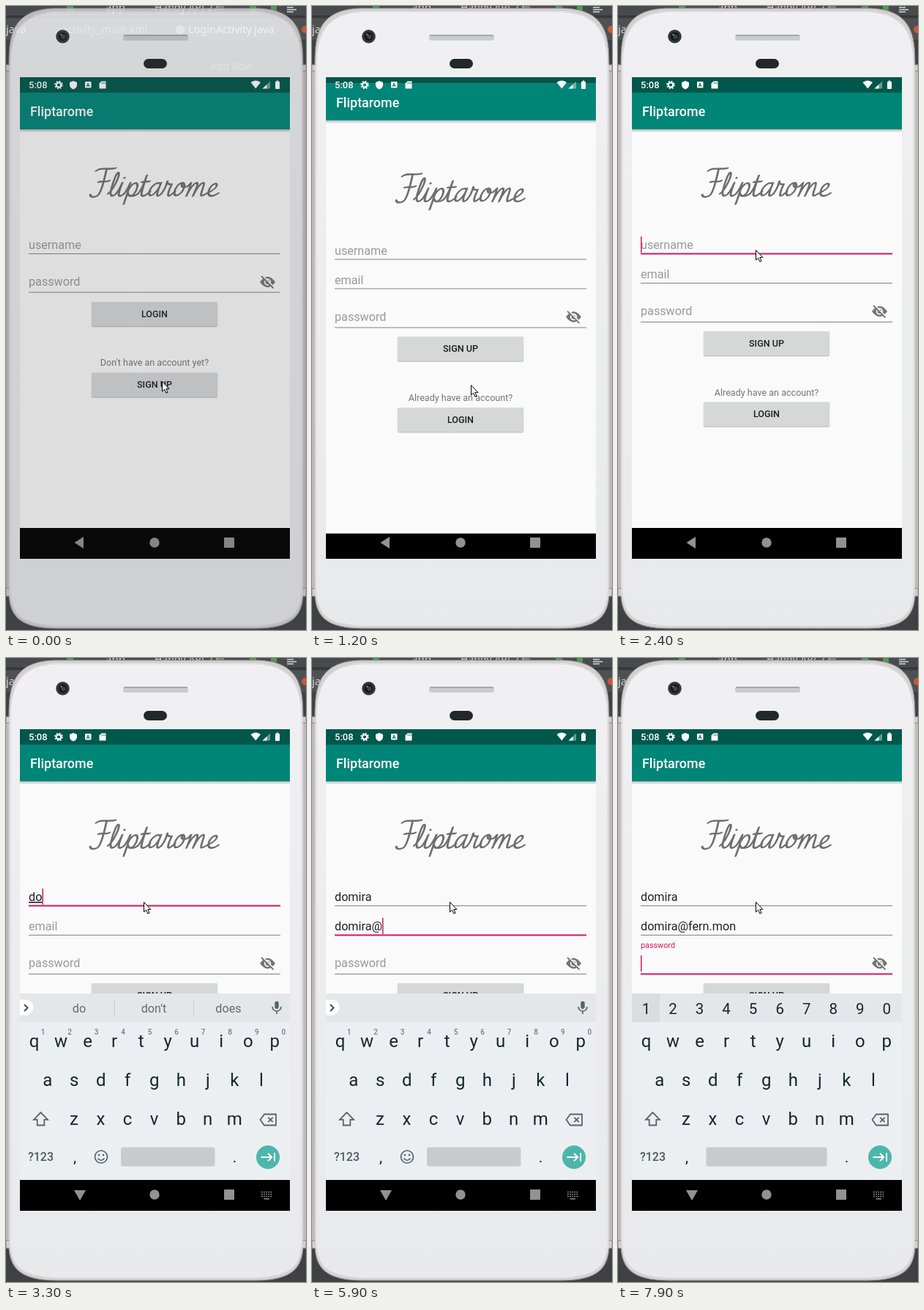
An HTML page for the animation above (8 s loop, 410x850 px).

```html
<!DOCTYPE html>
<html lang="en">
<head>
<meta charset="utf-8">
<title>Sign-up walkthrough</title>
<style>
html, body { margin: 0; width: 100%; height: 100%; overflow: hidden; background: #3c3f41; }
svg { display: block; width: 410px; height: 850px; font-family: Roboto, "Liberation Sans", sans-serif; }
.ide { font-family: "Noto Sans", "Open Sans", sans-serif; }
</style>
</head>
<body>
<svg id="stage" viewBox="0 0 410 850"></svg>
<script>
const LOOP = 8000, PINK = '#d3195f', GREY = '#757575', RULE = '#828282', INK = '#14272f', KEY = '#56656c';
const $ = id => document.getElementById(id);

// Markup helpers
const rect = (x, y, w, h, fill, more = '') =>
  `<rect x="${x}" y="${y}" width="${w}" height="${h}" fill="${fill}" ${more}/>`;
const text = (x, y, s, size, fill, more = '') =>
  `<text x="${x}" y="${y}" font-size="${size}" fill="${fill}" ${more}>${s}</text>`;
const mid = (x, y, s, size, fill, more = '') => text(x, y, s, size, fill, `text-anchor="middle" ${more}`);
const line = (d, color, w, more = '') =>
  `<path d="${d}" fill="none" stroke="${color}" stroke-width="${w}" ${more}/>`;
const fill = (d, color, more = '') => `<path d="${d}" fill="${color}" ${more}/>`;
const dot = (x, y, r, color, more = '') => `<circle cx="${x}" cy="${y}" r="${r}" fill="${color}" ${more}/>`;

// Script lettering: [advance, pen path] with the baseline at 0
const GLYPHS = {
  F: [20, 'M-4-34C0-40 12-35 22-38M10-37C10-24 11-10 8-3C6 2-2 3-4-2M3-19C9-21 14-18 18-21'],
  l: [11, 'M0-3C6-8 10-26 8-31C5-36 3-20 3-8C3 0 7 2 11-3'],
  i: [11, 'M0-3C2-6 4-12 5-18C4-10 3-6 4-2C6 2 9-1 11-3M6-25l.6 .6'],
  p: [19, 'M0-3C2-6 4-12 5-18C5-6 4 3 3 11M5-9C7-16 11-19 14-17C18-13 15-1 10 0C7 0 6-2 5-4M11 0C15 0 17-1 19-3'],
  t: [13, 'M0-3C3-7 5-16 6-28C5-14 4-7 5-2C7 2 11-1 13-3M1-19C5-20 8-19 12-20'],
  a: [19, 'M0-3L3-6M14-17C8-20 2-12 2-5C3 2 9 1 14-12M15-18C14-10 12-5 14-1C16 1 18-2 19-3'],
  r: [15, 'M0-3C3-8 4-14 4-20C5-15 8-16 11-16C10-10 8-5 10-1C12 1 14-2 15-3'],
  o: [18, 'M0-3L3-6M11-18C4-18 1-8 3-3C6 3 14-4 14-12C14-16 12-18 10-17C9-12 14-11 18-13'],
  m: [28, 'M0-13C2-15 3-17 4-18C4-10 3-4 2 0C4-9 8-18 12-18C15-17 12-6 11 0C13-9 17-18 21-18C24-17 20-5 22-1C24 1 26-2 28-3'],
  e: [17, 'M0-3C6-6 13-10 12-15C10-20 2-14 3-5C4 2 11 1 17-4']
};
const NAME = 'Fliptarome';
function script(x, y) {
  let pen = 0, out = '';
  for (const c of NAME) {
    const [adv, d] = GLYPHS[c];
    for (const nib of [0, 0.9]) out += `<path d="${d}" transform="translate(${pen + nib} ${-nib / 2})"/>`;
    pen += adv;
  }
  return `<g role="img" aria-label="${NAME}" transform="translate(${x} ${y}) skewX(-14)" fill="none"
    stroke="#6e6e6e" stroke-width="1.9" stroke-linecap="round" stroke-linejoin="round">${out}</g>`;
}

// Backdrop seen around, and at first through, the phone
const backdrop = () => `<g class="ide">
  ${rect(0, 0, 410, 850, '#3f4144')}${rect(0, 0, 410, 13, '#484b4d')}${rect(0, 13, 410, 1.5, '#2f3133')}
  ${rect(0, 17, 410, 29, '#4d5153')}${line('M177.5 46V706', '#5c5e62', 1)}
  ${rect(83, 0, 9, 7, '#4f9a58')}${rect(333, 0, 9, 9, '#4f9a58')}${rect(362, 0, 8, 6, '#4f9a58')}${rect(289, 0, 9, 6, '#8b7a72')}
  ${line('M384 2h9M384 5h13M384 8h9', '#d6d6d6', 1.5)}
  ${text(136, 7, 'app', 15, '#ddd')}${text(203, 7, 'Handy API 27', 14, '#ddd')}
  ${text(0, 37, 'java', 14.5, '#ddd')}${text(76, 37, 'activity_main.xml', 14.5, '#bbb')}
  ${dot(238, 32, 6, '#8dc3cf')}${text(249, 37, 'LoginActivity.java', 14.5, '#fff')}
  ${dot(409, 32, 5, '#c65a35')}${text(279, 87, 'Add Row', 14, '#999')}</g>`;

const OUTER = 'M0 80H4C4 42 7 5 66 3H344C403 5 406 42 406 80H410V804H406C404 830 392 848 340 848H70C18 848 6 830 4 804H0Z';
const INNER = 'M6 86C6 46 14 11 68 8H342C396 11 404 46 404 86V798C402 824 392 842 342 844H68C18 842 8 824 6 798Z';
const body = () => `
  <path d="${OUTER}" fill="#d3cfd1" stroke="#8c8788"/>
  ${line('M2.5 88V794M407.5 88V794', '#aaa5a8', 1)}
  <path d="${INNER}" fill="url(#shell)" stroke="#fbfbfb" stroke-width="2"/>
  <path d="${INNER}" fill="none" stroke="#bdb7ba" stroke-width=".7"/>
  ${line('M0 88.5H4M406 88.5H410M0 793.5H4M406 793.5H410', '#8b8587', 1)}
  ${dot(77.5, 41.5, 9.3, '#33383b')}${dot(77.5, 41.5, 6, '#15191b')}${dot(78.5, 42, 3, '#3d464b')}${dot(75.5, 39, 1.3, '#78858c')}
  ${rect(160, 39, 89, 8, '#c9cbcd', 'rx="3"')}${rect(161, 39, 87, 2, '#a6a8aa', 'rx="1"')}
  ${rect(188, 72, 32, 13, '#22272a', 'rx="6.5"')}`;

const status = () => `
  ${text(31, 112, '5:08', 13, '#fff', 'font-weight="500"')}
  <circle cx="72" cy="107.5" r="3.2" fill="none" stroke="#fff" stroke-width="2.2"/>
  <circle cx="72" cy="107.5" r="4.8" fill="none" stroke="#fff" stroke-width="2" stroke-dasharray="1.9 1.87"/>
  ${fill('M92 102l5 2v3.5c0 3-2 5-5 6c-3-1-5-3-5-6v-3.5z', '#fff')}
  ${rect(108, 103, 8.5, 8.5, '#fff', 'rx="1"')}${mid(112.2, 110, 'A', 7, '#00574b', 'font-weight="700"')}
  ${fill('M130.5 102.5h6v10h-9v-7z', '#fff')}${line('M131 104v2M133 104v2M135 104v2', '#00574b', 0.8)}
  ${fill('M334.5 104Q341.3 99 348 104L341.3 112.5z', '#fff')}
  ${fill('M361 102.5V112.5H350.5z', '#fff', 'opacity=".4"')}${fill('M356.5 107V112.5H350.5z', '#fff')}
  ${rect(368, 103, 6, 10, '#fff', 'rx=".8"')}${rect(369.7, 101.6, 2.6, 2, '#fff')}`;

// Form parts
const button = (y, label) => `${rect(117, y + 1, 172, 33.5, '#000', 'rx="2" opacity=".16"')}
  ${rect(116.4, y, 173.2, 33.8, '#000', 'rx="2" opacity=".09"')}${rect(117, y, 172, 33, '#d6d7d7', 'rx="2"')}
  ${mid(203, y + 20.8, label, 12.57, '#1e1e1e', 'font-weight="500"')}`;
const rule = (y, id) => line(`M31 ${y}H375`, RULE, 1, id ? `id="${id}"` : '');
const hint = (y, s, id) => text(31, y, s, 16.2, '#999', id ? `id="${id}"` : '');
const eye = y => `<g transform="translate(357.5 ${y})">${fill('M-10.5 0Q0-14.5 10.5 0Q0 14.5-10.5 0z', GREY)}
  ${dot(0, 0, 4.7, '#fafafa')}${dot(0, 0, 2.9, GREY)}${line('M-7-8.5L9.5 8', '#fafafa', 2)}${line('M-8.5-8L8 8.5', GREY, 1.8)}</g>`;
const windowOf = content => `${rect(19, 60, 369, 720, '#fafafa')}${rect(19, 60, 369, 58, '#00574b')}
  ${rect(19, 118, 369, 50, '#008577')}${rect(19, 168, 369, 4.5, 'url(#drop)')}
  ${text(33, 150, NAME, 17.96, '#fff', 'font-weight="500"')}${script(118, 259)}${content}
  ${rect(19, 711, 369, 80, '#000')}`;
const question = (y, s) => mid(203, y, s, 12.57, GREY);

const loginForm = () => hint(331, 'username') + rule(337.5) + hint(381, 'password') + rule(390) + eye(376) +
  button(403, 'LOGIN') + question(490, "Don't have an account yet?") + button(499.5, 'SIGN UP') +
  `<circle id="ripple" cx="217" cy="516" fill="#000" opacity=".13" clip-path="url(#press)"/>`;
const signForm = () => hint(331, 'username', 'userHint') + rule(337.5, 'line0') +
  hint(371, 'email', 'mailHint') + rule(377.5, 'line1') + hint(421, 'password', 'passHint') + rule(430.5, 'line2') +
  text(31, 331, '', 16.2, '#212121', 'id="user"') + text(31, 371, '', 16.2, '#212121', 'id="mail"') +
  rect(31, 314, 1.5, 22, PINK, 'id="caret"') + eye(416) +
  button(443, 'SIGN UP') + question(530.5, 'Already have an account?') + button(539.5, 'LOGIN');

// Keyboard
const ROWS = [['qwertyuiop', 38.5, 530], ['asdfghjkl', 56.7, 583], ['zxcvbnm', 93, 636]];
const keyX = (x0, i) => x0 + 36.53 * i;
const digits = draw => [...'1234567890'].map((d, i) => draw(d, keyX(38.5, i))).join('');
const keyboard = () => `<g id="kbd">${rect(19, 457, 369, 254, '#eceff1')}${rect(19, 457, 369, 39, '#e4e7e9')}
  <g id="strip">${fill('M19 465.5H27a10.5 10.5 0 0 1 0 21H19z', '#fff')}${line('M25 472l4.5 4.5l-4.5 4.5', '#3c4a50', 1.9)}
    <g id="words">${line('M148.5 466V487M256.5 466V487', '#c4cacd', 1)}
      ${[100, 202, 304].map((x, i) => mid(x, 482.5, '', 16.2, '#5e6b72', `id="word${i}"`)).join('')}</g>
    ${rect(367.3, 467.5, 5.4, 10.5, KEY, 'rx="2.7"')}${line('M364 475a6 6 0 0 0 12 0M370 481v4', KEY, 1.7)}</g>
  <g id="numbers">${rect(19, 457, 38, 39, '#dadddf')}${digits((d, x) => mid(x, 484.5, d, 20.5, INK))}</g>
  <g id="supers">${digits((d, x) => mid(x + 12, 512.5, d, 10, '#727d83', 'font-weight="500"'))}
    ${line('M138.5 679.5a8.5 8.5 0 1 1-17 0a8.5 8.5 0 1 1 17 0M125.5 681.5q4.5 5.5 9 0', KEY, 1.7)}
    ${dot(127, 677, 1.3, KEY)}${dot(133, 677, 1.3, KEY)}</g>
  ${ROWS.map(([keys, x0, y]) => [...keys].map((k, i) => mid(keyX(x0, i), y, k, 24, INK, 'class="key"')).join('')).join('')}
  ${line('M47.5 619L38 628.8H42.7V636.5H52.3V628.8H57z', KEY, 1.8)}
  ${line('M347.5 629L353 621.5H369V636.5H353zM358.3 625.8l6.4 6.4M364.7 625.8l-6.4 6.4', KEY, 1.8)}
  ${mid(47.5, 685, '?123', 16, '#4b5a61', 'font-weight="500"')}${mid(94, 687, ',', 21, INK)}${mid(312.5, 687, '.', 21, INK)}
  <rect id="space" y="666.5" height="26" rx="3" fill="#c8cbce"/>
  ${dot(358, 680, 16, '#4db6ac')}${line('M348.5 680H363M358 674.8l5.2 5.2l-5.2 5.2M367 674V686', '#fff', 2)}</g>`;

const nav = () => `
  ${fill('M106 723V739L93.5 731z', '#929292', 'id="back"')}${fill('M93 725H109L101 739z', '#929292', 'id="down"')}
  ${dot(203, 731, 6.7, '#929292')}${rect(298, 724, 14, 14, '#929292', 'rx="1"')}
  <g id="imeIcon">${line('M349 727.5H363.5M349 730.5H363.5M349 733.5H363.5', '#929292', 1.6, 'stroke-dasharray="1.8 1.3"')}
  ${line('M352.5 736.7H360', '#929292', 1.5)}</g>`;

$('stage').innerHTML = `<defs>
  <linearGradient id="shell" x2="0" y2="1"><stop stop-color="#f0f0f2"/><stop offset="1" stop-color="#e8e9eb"/></linearGradient>
  <linearGradient id="drop" x2="0" y2="1"><stop stop-color="#000" stop-opacity=".26"/><stop offset="1" stop-color="#000" stop-opacity="0"/></linearGradient>
  <clipPath id="screen"><rect x="19" y="97" width="369" height="656"/></clipPath>
  <clipPath id="reveal"><rect id="revealBox" x="19" width="369" height="656"/></clipPath>
  <clipPath id="press"><rect x="117" y="499.5" width="172" height="33" rx="2"/></clipPath></defs>
  ${backdrop()}
  <g id="phone">${body()}<g clip-path="url(#screen)">
    <g id="login">${windowOf(loginForm())}</g>
    <g id="signup" clip-path="url(#reveal)"><g id="signWin">${windowOf(signForm())}</g></g>
    ${keyboard()}${status()}${nav()}</g></g>
  <path id="cursor" d="M.5 .5V14L3.6 11.2L5.8 16.2L8 15.2L5.8 10.4H9.8z" fill="#fff" stroke="#000" stroke-width="1"/>`;

// Tables of [start ms, value]
const typed = (start, s) => [...s].map((c, i) => [start + 100 * i, s.slice(0, i + 1)]);
const USER = [[0, ''], [3300, 'do'], [3600, 'dom'], [3700, 'domi'], [3800, 'domira']];
const MAIL = [[0, ''], ...typed(5300, 'domira@'), [6700, 'domira@f'], [6800, 'domira@fe'], [7000, 'domira@fern'],
  [7300, 'domira@fern.'], [7400, 'domira@fern.m'], [7500, 'domira@fern.mo'], [7600, 'domira@fern.mon']];
const FOCUS = [[0, -1], [2400, 0], [4000, 1], [7800, 2]];
const CARET = [[0, 0], [2400, 1], [4400, 0], [4800, 1], [6500, 0], [6700, 1]];
const WORDS = [[0, ''], [3300, "do|don't|does"], [3600, 'dom|domain|domestic'], [3700, 'domi|domino|dominant'],
  [3800, 'domira|admire|dominate'], [4000, 'thanks|I|we'], [5300, 'd|do|did'], [5400, "do|don't|does"],
  [5500, 'dom|domain|domes'], [5600, 'domi|domino|domain'], [5700, ''], [7300, 'thanks|I|we'], [7400, '']];
const RIPPLE = [[0, 0], [800, 40], [900, 120], [1500, 0]];
// Progress of the new window and the share of it still hidden at the top
const ENTER = [[0, 0], [1000, 0.22], [1100, 0.5], [1200, 0.72], [1300, 0.87], [1400, 0.945], [1500, 1]];
const HIDDEN = [[0, 1], [1000, 0.7], [1100, 0.4], [1200, 0.15], [1300, 0.03], [1400, 0]];

const at = (table, t) => table.reduce((v, [start, value]) => t >= start ? value : v, table[0][1]);
const show = (id, on) => { $(id).style.display = on ? '' : 'none'; };
const set = (id, attrs) => { for (const k in attrs) $(id).setAttribute(k, attrs[k]); };
const put = (id, s) => { if ($(id).textContent !== s) $(id).textContent = s; };

function cursorAt(t) {
  if (t < 200) return t < 100 ? [213, 511] : [215, 513];
  const p = Math.min(1, Math.max(0, (t - 1600) / 600)), e = p * p * (3 - 2 * p);
  return [217 - 29 * e, 516 - 184 * e];
}

function render(t) {
  const focus = at(FOCUS, t), user = at(USER, t), mail = at(MAIL, t), p = at(ENTER, t);
  const typing = t >= 3300, secret = focus === 2;
  set('phone', { opacity: t < 600 ? 0.85 : 1 });
  set('cursor', { transform: `translate(${cursorAt(t)})` });
  set('ripple', { r: at(RIPPLE, t) });

  show('login', p < 1);
  show('signup', p > 0);
  set('login', { transform: `translate(0 ${-17 * p})` });
  set('signWin', { transform: `translate(0 ${27 * (1 - p)})` });
  set('revealBox', { y: 97 + 656 * at(HIDDEN, t) });

  put('user', user);
  put('mail', mail);
  set('user', { 'text-decoration': focus === 0 ? 'underline' : 'none' });
  show('userHint', !user);
  show('mailHint', !mail);
  const lift = secret ? (t < 7900 ? 0.6 : 1) : 0;
  set('passHint', { y: 421 - 26 * lift, 'font-size': 16.2 - 5.4 * lift, fill: secret ? PINK : '#999' });
  for (let i = 0; i < 3; i++)
    set('line' + i, { stroke: i === focus ? PINK : RULE, 'stroke-width': i === focus ? 1.8 : 1 });
  const field = ['user', 'mail'][focus];
  const width = field && $(field).textContent ? $(field).getComputedTextLength() : 0;
  show('caret', at(CARET, t));
  set('caret', { x: 31 + width, y: [314, 354, 405][focus] || 314 });

  show('kbd', typing);
  show('down', typing);
  show('imeIcon', typing);
  show('back', !typing);
  show('strip', !secret);
  show('numbers', secret);
  show('supers', !secret);
  set('space', { x: secret ? 120.5 : 157, width: secret ? 165 : 128.5 });
  const words = at(WORDS, t).split('|');
  show('words', words.length > 1);
  for (let i = 0; i < 3; i++) put('word' + i, words[i] || '');
  const shift = t >= 5800 && t < 5900;
  for (const key of document.querySelectorAll('.key')) {
    const k = key.textContent, want = shift ? k.toUpperCase() : k.toLowerCase();
    if (k !== want) key.textContent = want;
  }
}

const start = performance.now();
let last = -1;
function tick() {
  const t = Math.floor((performance.now() - start) % LOOP / 100) * 100;
  if (t !== last) render(last = t);
  requestAnimationFrame(tick);
}
tick();
</script>
</body>
</html>
```
